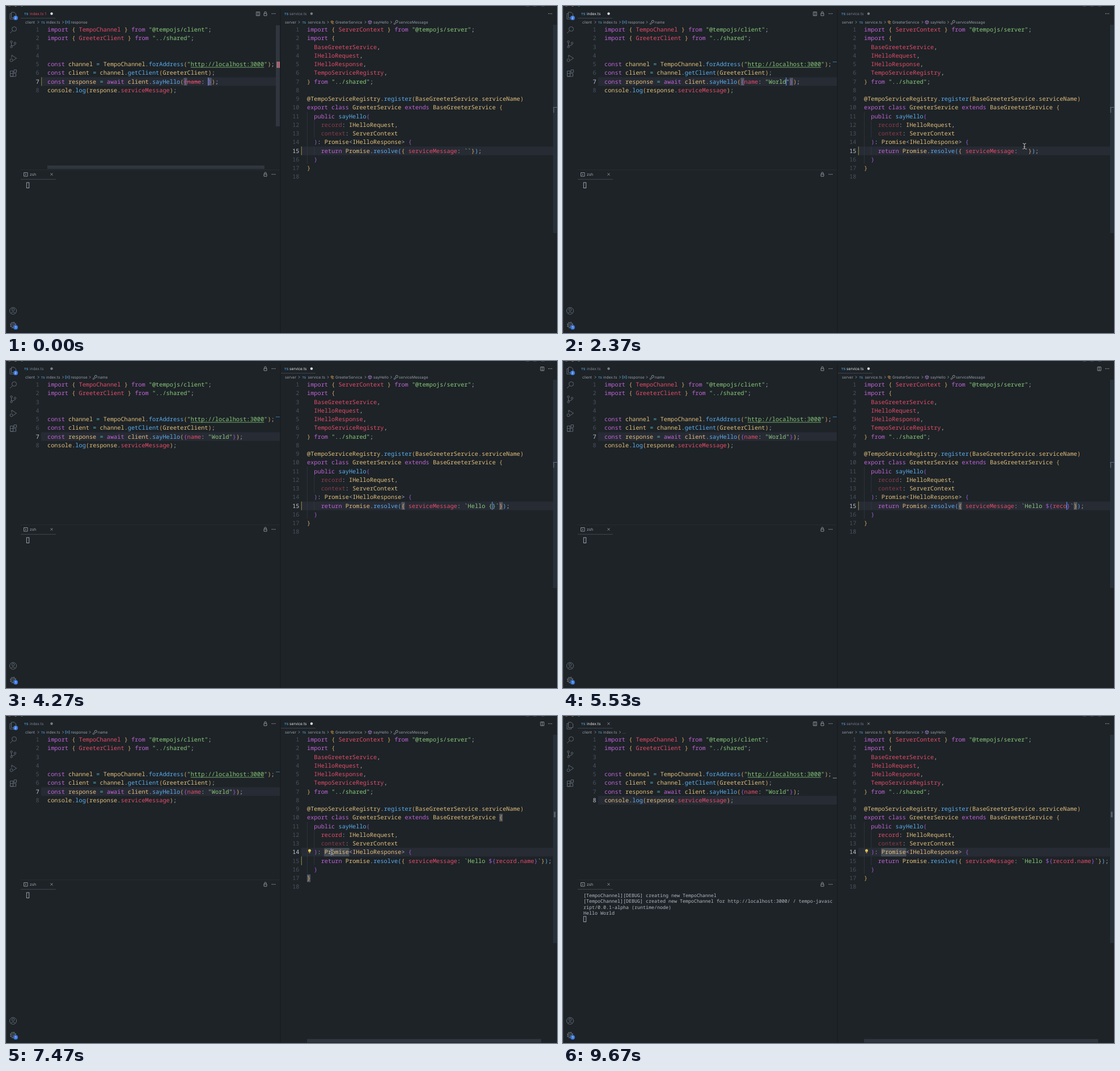
Write an HTML page that moves like this. It is 972 px wide and 576 px high and loops after 9.71 s.

```html
<!DOCTYPE html>
<html lang="en">
<head>
<meta charset="utf-8">
<title>Editor session</title>
<style>
html, body { margin: 0; width: 972px; height: 576px; overflow: hidden; background: #1d2327; }
svg { display: block; }
text { white-space: pre; text-rendering: geometricPrecision; }
.code { font: 10.275px "Noto Sans Mono", "DejaVu Sans Mono", monospace; }
.term { font: 8.333px "Noto Sans Mono", "DejaVu Sans Mono", monospace; }
.ui { font: 6.65px Inter, Roboto, sans-serif; }
.doc { font: 9.26px Inter, Roboto, sans-serif; }
.icon { fill: none; stroke: #606873; stroke-width: 1; }
.small { fill: none; stroke: #a4abb4; stroke-width: .8; }
</style>
</head>
<body>
<svg width="972" height="576" viewBox="0 0 972 576">
  <g id="scene"></g>
  <g id="mouse" fill="none">
    <path d="M-3-5Q0-5 0-3Q0-5 3-5M0-3V3M-3 5Q0 5 0 3Q0 5 3 5M-1.5 1H1.5" stroke="#111" stroke-width="2.2"/>
    <path d="M-3-5Q0-5 0-3Q0-5 3-5M0-3V3M-3 5Q0 5 0 3Q0 5 3 5M-1.5 1H1.5" stroke="#d0d3d6" stroke-width="1"/>
  </g>
</svg>
<script>
const LOOP = 9710, CW = 6.165, LH = 15.26, TOP = 33.9;
const LEFT = 73, RIGHT = 531;
const INK = {
  p: '#c263d8', y: '#e3bf7c', r: '#e64c69', b: '#5caef0', g: '#8bcb7b',
  w: '#abb2bf', o: '#d8a765', c: '#56b2c0', d: '#8b3c4d', u: '#9a5ad0'
};

// "~x" switches to ink x for the text that follows.
const leftCode = [
  '~pimport ~o{ ~rTempoChannel ~o} ~pfrom ~g"@tempojs/client"~w;',
  '~pimport ~o{ ~rGreeterClient ~o} ~pfrom ~g"../shared"~w;',
  '', '',
  '~pconst ~ychannel ~c= ~yTempoChannel~w.~bforAddress~o(~g"http://localhost:3000"~o)~w;',
  '~pconst ~yclient ~c= ~ychannel~w.~bgetClient~o(~yGreeterClient~o)~w;',
  '~pconst ~yresponse ~c= ~pawait ~yclient~w.~bsayHello~o(~u{~rname~w: ',
  '~yconsole~w.~blog~o(~yresponse~w.~rserviceMessage~o)~w;'
];
const rightCode = [
  '~pimport ~o{ ~rServerContext ~o} ~pfrom ~g"@tempojs/server"~w;',
  '~pimport ~o{',
  '  ~rBaseGreeterService~w,',
  '  ~rIHelloRequest~w,',
  '  ~rIHelloResponse~w,',
  '  ~rTempoServiceRegistry~w,',
  '~o} ~pfrom ~g"../shared"~w;',
  '',
  '~y@TempoServiceRegistry~w.~bregister~o(~yBaseGreeterService~w.~yserviceName~o)',
  '~pexport class ~yGreeterService ~pextends ~yBaseGreeterService ~o{',
  '  ~ppublic ~bsayHello~u(',
  '    ~drecord~w: ~yIHelloRequest~w,',
  '    ~dcontext~w: ~yServerContext',
  '  ~u)~w: ~yPromise~w<~yIHelloResponse~w> ~u{',
  '    ~preturn ~yPromise~w.~bresolve(~o{ ~rserviceMessage~w: ',
  '  ~u}',
  '~o}',
  ''
];

// Typing steps: [time, text with "|" as the caret].
const typed = (start, step, pre, word, post) =>
  [...word].map((_, i) => [start + i * step, pre + word.slice(0, i + 1) + '|' + post]);
const nameSteps = [[0, '|'], [150, '"|"'], ...typed(240, 90, '"', 'World', '"')];
const helloSteps = [
  [0, '|'],
  ...typed(3500, 105, '', 'Hello ', ''),
  [4130, 'Hello {|}'], [4520, 'Hello |{}'], [4750, 'Hello $|{}'], [4950, 'Hello ${|}'],
  ...typed(5150, 110, 'Hello ${', 'record.name', '}')
];
// Pointer stops: [time, x, y]; hidden between groups.
const paths = [
  [[1000, 346, 148], [1130, 324, 133], [1300, 324, 133], [2250, 814, 247], [2620, 814, 247], [2770, 816, 252], [3500, 816, 252]],
  [[6430, 934, 263], [6600, 916, 258], [6850, 916, 258], [7150, 575, 240], [7650, 575, 240], [8120, 392, 197], [8200, 388, 195], [8340, 318, 149], [8450, 318, 149]]
];

const esc = s => s.replace(/&/g, '&amp;').replace(/</g, '&lt;');
const at = (steps, t) => steps.filter(s => s[0] <= t).pop()[1];
const rowY = n => TOP + (n - 1) * LH;
const rect = (x, y, w, h, fill, more = '') => `<rect x="${x}" y="${y}" width="${w}" height="${h}" fill="${fill}" ${more}/>`;
const path = (d, cls = 'icon', more = '') => `<path class="${cls}" d="${d}" ${more}/>`;
const dot = (x, y, r, fill) => `<circle cx="${x}" cy="${y}" r="${r}" fill="${fill}"/>`;
const text = (x, y, s, fill, cls = 'ui', more = '') => `<text class="${cls}" x="${x}" y="${y}" fill="${fill}" ${more}>${esc(s)}</text>`;
const blink = (t, base) => (t - base + LOOP * 1000) % 1000 < 500;

function code(x, y, src) {
  let col = 0, out = '';
  for (const [i, part] of src.split('~').entries()) {
    const s = i ? part.slice(1) : part;
    if (s.trim()) out += `<tspan x="${(x + col * CW).toFixed(2)}" fill="${i ? INK[part[0]] : INK.w}">${esc(s)}</tspan>`;
    col += s.length;
  }
  return `<text class="code" y="${y.toFixed(2)}">${out}</text>`;
}
const caret = (x, row, col) => rect(x + col * CW - .5, rowY(row) + .5, 1.2, 14.2, '#5b8dff');
const bracket = (x, row, col) => rect(x + col * CW, rowY(row) + 1, CW, 13.5, '#50545d');

function rows(x, numX, lines, active) {
  return lines.map((src, i) =>
    text(numX, rowY(i + 1) + 11.1, String(i + 1), i + 1 === active ? '#c3c9d2' : '#4a515d', 'code', 'text-anchor="end"') +
    code(x, rowY(i + 1) + 11.1, src)).join('');
}

function template(s) {
  const m = s.match(/^(.*)\$\{(.*)\}$/);
  return '~g`' + (m ? `${m[1]}~u\${~r${m[2].replace('.', '~w.~r')}~u}~g` : s) + '`~o}~b)~w;';
}

const close = (x, y) => path(`M${x - 2} ${y - 2}l4 4m0-4l-4 4`, 'small');
const more = (x, y) => [-2.6, 0, 2.6].map(d => dot(x + d, y, .7, '#a4abb4')).join('');
const split = (x, y) => path(`M${x - 3} ${y - 3}h6v6.5h-6zM${x} ${y - 3}v6.5`, 'small');
const lock = (x, y) => path(`M${x - 2.5} ${y - .5}h5v4h-5zM${x - 1.6} ${y - .5}v-1.6a1.6 1.6 0 0 1 3.2 0v1.6`, 'small');
const badge = (y, n) => dot(17, y, 4, '#3b78e0') + text(17, y + 2, n, '#fff', 'ui', 'text-anchor="middle" style="font-size:5.5px"');

function chrome() {
  return rect(0, 0, 1, 576, '#2d3338') + rect(483.5, 6, 1, 570, '#161a1e') +
    dot(6, -2.3, 3, '#d8574f') + dot(17, -2.3, 3, '#cf9f3c') + dot(28, -2.3, 3, '#4fa64a') +
    [920, 933, 947].map(x => path(`M${x - 3} 0h6`, 'icon')).join('') +
    path('M9.5 11h5l3 3v6.5h-8zM9.5 13.5h-2.500v9.500h7.500v-2.500') +
    `<circle class="icon" cx="14.500" cy="40.500" r="4"/>` + path('M11.600 43.500l-4.500 4.500') +
    `<g class="icon"><circle cx="9.500" cy="63" r="1.700"/><circle cx="9.500" cy="72" r="1.700"/><circle cx="16" cy="65.500" r="1.700"/></g>` +
    path('M9.500 65v5M16 67.500q0 2.500-6.500 2.500') +
    path('M10 91v-4.500l8.500 5.500l-6 4') + `<circle class="icon" cx="9.500" cy="95.500" r="2.500"/>` +
    path('M7.500 114.500h5v9.500h-5zM7.500 119h10v5h-10zM14 112.500h4.500v4.500h-4.500z') +
    `<g class="icon"><circle cx="12.500" cy="537" r="6"/><circle cx="12.500" cy="535" r="2.200"/></g>` + path('M8.500 541.300q4-4.600 8 0') +
    `<g class="icon"><circle cx="12.500" cy="562" r="4.700" stroke-width="2" stroke-dasharray="2.200 1.490"/><circle cx="12.500" cy="562" r="3.600"/><circle cx="12.500" cy="562" r="1.300"/></g>` +
    badge(566, '1') +
    more(472, 13.500) + lock(457.500, 13.500) + more(960, 13.500) +
    rect(25, 288, 458, .7, '#2a3036') + rect(26, 304.800, 62, .9, '#454c55') +
    path('M31.500 293.500h6.500v6.500h-6.500zM33.500 295.200l1.700 1.600l-1.700 1.600', 'small') +
    text(42, 299.300, 'zsh', '#a4abb4') + close(80.500, 296.500) + lock(457.500, 296.500) + more(472, 296.500);
}

function tab(x, title, active, dirty, error) {
  const ink = error ? '#e0455f' : active ? '#e4e7eb' : '#7b838d';
  const end = x === 32 ? 80.500 : 539;
  return text(x, 15.700, 'TS', '#4b93c9', 'ui', 'style="font-size:5.5px;font-weight:700"') +
    text(x === 32 ? 42 : 500, 16, title, ink) +
    (dirty ? dot(end, 13.500, 2.200, active ? '#dfe2e6' : '#777f89') : close(end, 13.500)) +
    (active ? rect(x - 6, 21, end - x + 13, .8, '#454c55') : '');
}

const crumbInk = '#969da7';
const crumb = (x, s) => text(x, 31, s, crumbInk);
const arrow = x => path(`M${x - 1} 26.500l2 2l-2 2`, 'small');
const wrench = x => path(`M${x - 3} 31.500l3.500-3.500a2 2 0 1 1 1.500 1.200l-3.500 3.300z`, 'small');
const ts = x => text(x, 30.600, 'TS', '#4b93c9', 'ui', 'style="font-size:5px;font-weight:700"');

function crumbs(t) {
  let out = crumb(34, 'client') + arrow(57) + ts(62) + crumb(71, 'index.ts') + arrow(100.500);
  if (t < 8400) {
    out += path('M106.500 26h-1.500v5h1.500M110.500 26h1.500v5h-1.500', 'small', 'style="stroke:#5a9fd6"') +
      `<circle class="small" cx="108.500" cy="28.500" r="1.300" style="stroke:#5a9fd6"/>` + crumb(114.500, 'response');
    if (t >= 900) out += arrow(148) + wrench(156) + crumb(162, 'name');
  } else out += crumb(105, '...');
  out += crumb(492, 'server') + arrow(517) + ts(522.500) + crumb(532.500, 'service.ts') + arrow(568) +
    path('M573.500 26.500h3v2.500h-3zM576.500 28h2M575 29v2h3.500', 'small', 'style="stroke:#d99a4e"') +
    crumb(581, 'GreeterService') + arrow(634) +
    path('M642 25.500l2.800 1.500v3.200l-2.800 1.500l-2.800-1.500v-3.200zM639.200 27l2.800 1.400l2.800-1.400M642 28.400v3.300', 'small', 'style="stroke:#b180d7"') +
    crumb(648, 'sayHello');
  if (t < 7520) out += arrow(679.500) + wrench(687) + crumb(693, 'serviceMessage');
  return out;
}

function popup() {
  const x = 743, y = 178;
  return rect(x, y, 222, 69.500, '#1a1f23', 'stroke="#252b30" stroke-width=".6"') +
    code(748, 190, '~o(~rproperty~o) ~yIHelloRequest~w.~rname~w:') + code(748, 205.300, '~rstring') +
    text(748, 226, 'The name to be used in the greeting, of type', '#c5cad1', 'doc') +
    text(748, 241, 'string.', '#c5cad1', 'doc');
}

function terminal(t) {
  const lines = t < 9000 ? [] : [
    '[TempoChannel][DEBUG] creating new TempoChannel',
    '[TempoChannel][DEBUG] created new TempoChannel for http://localhost:3000/ / tempo-javasc',
    'ript/0.0.1-alpha (runtime/node)',
    'Hello World'
  ];
  return lines.map((s, i) => text(36, 318.500 + i * 10.500, s, '#b3b9c3', 'term')).join('') +
    rect(36.300, 311 + lines.length * 10.500, 4.400, 9.500, 'none', 'stroke="#a9b0ba" stroke-width=".9"');
}

function scene(t) {
  const rightFocus = t >= 2770 && t < 8350, back = t >= 8350;
  const moved = t >= 7180, savedRight = t >= 7600, savedLeft = t >= 8430;
  const broken = t < 800;
  const leftRow = back ? 8 : 7, rightRow = moved ? 14 : 15;
  const arg = at(nameSteps, t), msg = at(helloSteps, t);
  const argCol = 46 + arg.indexOf('|'), msgCol = 46 + msg.indexOf('|');
  const argText = arg.replace('|', ''), msgText = msg.replace('|', '');

  const left = [...leftCode], right = [...rightCode];
  left[6] += `~g${argText}~u}~o)~w;`;
  right[14] += template(msgText);
  if (t >= 5700) right[11] = right[11].replace('~d', '~r');

  let out = rect(62, rowY(leftRow), 421, LH, '#272b34') + rect(521, rowY(rightRow), 444, LH, '#272b34');

  // Indent guides
  out += rect(531, rowY(11), .7, LH * 6, '#343b42') + rect(543.500, rowY(12), .7, LH * 2, '#343b42') +
    rect(543.500, rowY(15), .7, LH, '#343b42');

  // Scrollbars and overview marks
  if (t < 1900 || (t >= 7950 && t < 8700)) out += rect(476, 34, 7, 178, '#30363d') + rect(73, 281, 383, 6, '#30363d');
  out += rect(965, 33, 6.500, 367, '#283039');
  if (t >= 5900) out += rect(531, 569, 413, 6, '#30363d');
  out += broken ? rect(477.500, 98, 5.500, 11, '#8d8f96') + rect(479, 98, 2.500, 11, '#cf3f52')
    : back ? rect(476, 108.800, 7, 1, '#8d949c') : rect(476, 98, 7, 1, '#3c75ad');
  out += moved ? rect(966.500, 168.500, 3, 10, '#56616d') : rect(965, 178, 7, 1, '#56718d') + rect(965.500, 178, 1.500, 10, '#56616d');

  // Matching brackets and word highlight
  if (t < 2770) out += bracket(LEFT, 7, 39) + bracket(LEFT, 7, 46 + argText.length);
  if (rightFocus && !moved) out += bracket(RIGHT, 15, 27) + bracket(RIGHT, 15, 47 + msgText.length);
  if (moved && !back) out += bracket(RIGHT, 10, 55) + bracket(RIGHT, 17, 0);
  if (moved) out += rect(RIGHT + 5 * CW, rowY(14) + .8, 7 * CW, 13.800, '#444a53', 'stroke="#5c626b" stroke-width=".6"');

  // Change bars in the gutters
  if (t < 600) out += rect(62, rowY(7), 1.200, LH, '#7c7440');
  if (!savedRight) out += rect(520.700, rowY(15), 1.200, LH, '#8a8145');

  out += rows(LEFT, 58.700, left, leftRow) + rows(RIGHT, 517.500, right, rightRow);
  out += rect(LEFT + 41 * CW, 107.600, 21 * CW, .8, INK.g);
  if (t < 150) out += rect(LEFT + 39 * CW, 133, 5 * CW, .9, '#c4455c');

  // Carets
  if (t < 2770 && (t < 700 || blink(t, 200))) out += caret(LEFT, 7, argCol);
  if (rightFocus && !moved && ((t >= 3500 && t < 6250) || blink(t, t < 3500 ? 2770 : 6250))) out += caret(RIGHT, 15, msgCol);
  if (moved && !back && blink(t, 7180)) out += caret(RIGHT, 14, 7);
  if (back && blink(t, 9030)) out += caret(LEFT, 8, 37);

  if (moved) out += dot(535.500, 237, 2.500, '#e3c44f') + rect(534.300, 239.500, 2.400, 2, '#a8935a');

  out += chrome() + tab(32, broken ? 'index.ts 1' : 'index.ts', !rightFocus, !savedLeft, broken) +
    tab(491, 'service.ts', rightFocus, !savedRight) +
    (rightFocus ? split(946, 13.500) : split(444.500, 13.500));
  if (!savedLeft) out += badge(21, savedRight ? '1' : '2');
  out += crumbs(t) + terminal(t);
  if (t >= 6560 && t < 6950) out += popup();
  return out;
}

function pointer(t) {
  const stops = paths.find(p => t >= p[0][0] && t < p[p.length - 1][0]);
  if (!stops) return null;
  const i = stops.findIndex(s => s[0] > t), [t0, x0, y0] = stops[i - 1], [t1, x1, y1] = stops[i];
  const k = (t - t0) / (t1 - t0), e = k * k * (3 - 2 * k);
  return [x0 + (x1 - x0) * e, y0 + (y1 - y0) * e];
}

const sceneEl = document.getElementById('scene'), mouseEl = document.getElementById('mouse');
let shown = '';
const started = performance.now();
function draw() {
  const t = Math.max(0, performance.now() - started) % LOOP;
  const next = scene(t), p = pointer(t);
  if (next !== shown) sceneEl.innerHTML = shown = next;
  mouseEl.style.display = p ? '' : 'none';
  if (p) mouseEl.setAttribute('transform', `translate(${p[0].toFixed(1)} ${p[1].toFixed(1)})`);
  requestAnimationFrame(draw);
}
draw();
</script>
</body>
</html>
```
